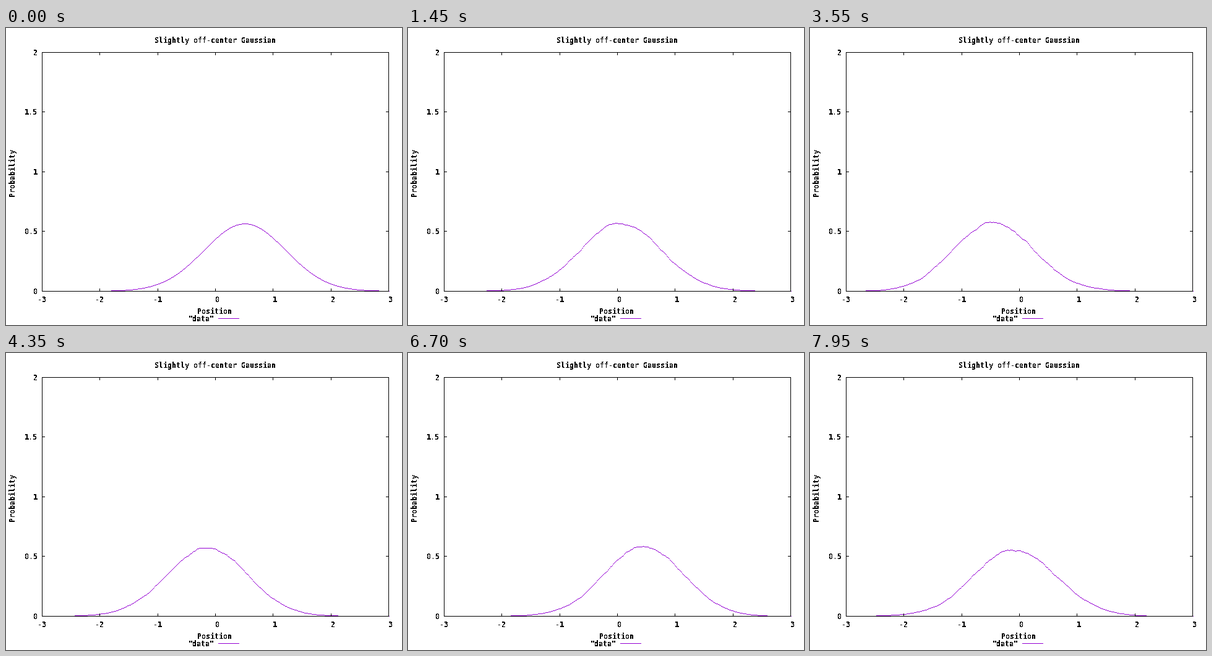
These frames come from a looping animation (640 px wide and 480 px high, 8 s). A matplotlib script:

```python
import numpy as np
import matplotlib.pyplot as plt
from matplotlib.animation import FuncAnimation

W, H, DPI = 640, 480, 100
FRAMES, STEP_MS = 160, 50
LEFT, RIGHT, TOP, BOTTOM = 58, 618, 39, 425
TICK = 4
PX = 72 / DPI                      # one pixel in points
PURPLE = "#9400d3"

plt.rcParams["font.family"] = "DejaVu Sans Mono"
plt.rcParams["text.antialiased"] = False

fig = plt.figure(figsize=(W / DPI, H / DPI), dpi=DPI, facecolor="white")
ax = fig.add_axes([0, 0, 1, 1])
ax.set_xlim(0, W)
ax.set_ylim(H, 0)
ax.axis("off")


def to_x(v):
    return LEFT + (v + 3) * (RIGHT - LEFT) / 6


def to_y(v):
    # whole pixel row, halves go up
    return np.ceil(BOTTOM - v * (BOTTOM - TOP) / 2 - 0.5)


def line(xs, ys, color="black"):
    ax.plot(np.add(xs, 0.5), np.add(ys, 0.5), color=color, lw=PX,
            antialiased=False, zorder=3, solid_capstyle="projecting",
            snap=False)


def label(x, y, s, ha="center", va="baseline", **kw):
    ax.text(x, y, s, ha=ha, va=va, size=11.63 * PX, weight="bold", **kw)


# Frame, ticks and labels
line([LEFT, RIGHT, RIGHT, LEFT, LEFT], [TOP, TOP, BOTTOM, BOTTOM, TOP])
for v in range(-3, 4):
    x = round(to_x(v))
    line([x, x], [BOTTOM, BOTTOM - TICK])
    line([x, x], [TOP, TOP + TICK])
    label(x + (0.5 if v < 0 else 3.5), 443, str(v))
for v in (0, 0.5, 1, 1.5, 2):
    y = to_y(v)
    line([LEFT, LEFT + TICK], [y, y])
    line([RIGHT, RIGHT - TICK], [y, y])
    label(51, y + 5, f"{v:g}", ha="right")

label(337.5, 24, "Slightly off-center Gaussian")
label(337.5, 462, "Position")
label(336.5, 474, '"data"', ha="right")
label(17.5, 233, "Probability", ha="right", va="center", rotation=90)
line([343, 376], [469, 469], PURPLE)

# Displaced wave packet in a harmonic well between hard walls at +-3
N = 600
grid = np.linspace(-3, 3, N + 1)
dx = grid[1] - grid[0]
inner = grid[1:-1]
hop = np.full(N - 2, -0.5 / dx**2)
ham = np.diag(1 / dx**2 + inner**2 / 2) + np.diag(hop, 1) + np.diag(hop, -1)
energy, modes = np.linalg.eigh(ham)
start = np.pi**-0.25 * np.exp(-(inner - 0.5)**2 / 2)
weights = modes.T @ start


def density(t):
    psi = modes @ (weights * np.exp(-1j * energy * t))
    return np.pad(np.abs(psi)**2, 1)


# The curve is one pixel per column, under the frame
cols = np.arange(LEFT, RIGHT + 1)
curve, = ax.plot([], [], ",", color=PURPLE, antialiased=False, zorder=2)


def draw(i):
    p = np.interp(cols, to_x(grid), density(i * STEP_MS / 1000))
    curve.set_data(cols + 0.5, to_y(p) + 0.5)
    return curve,


anim = FuncAnimation(fig, draw, frames=FRAMES, interval=STEP_MS,
                     repeat=True, repeat_delay=0, blit=False)
plt.show()
```
